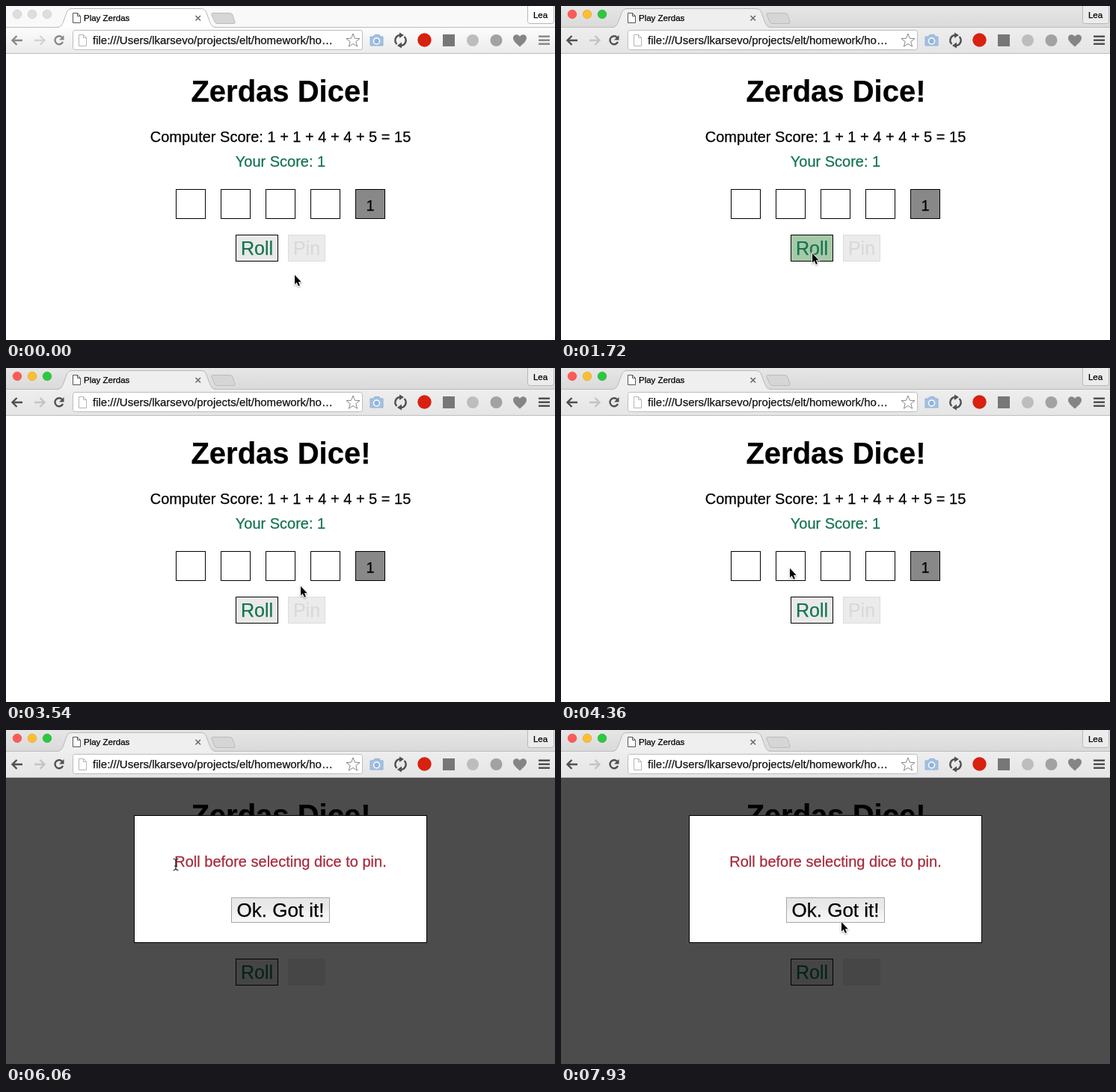
Animation, 734 px wide and 447 px high, one loop 8000 ms. Source, as an HTML page:

```html
<!DOCTYPE html>
<html lang="en">
<head>
<meta charset="utf-8">
<title>Play Zerdas</title>
<style>
  html, body { margin: 0; width: 100%; height: 100%; overflow: hidden; background: #fff; }
  svg { display: block; width: 734px; height: 447px; font: 20px "Liberation Sans", Arial, sans-serif; }
  text { fill: currentColor; stroke: currentColor; stroke-width: .25; }
  .mid { text-anchor: middle; }
  .line { fill: none; stroke: #505050; stroke-width: 2.4; }
  .big { font-size: 25px; }
  .small { font-size: 11.5px; }
  .blur .nav { opacity: .65; }
  .blur .lights circle { fill: #dedede; stroke: #c4c4c4; }
  .blur .strip { fill: #f9f9f9; }
  .blur .bar { fill: url(#pale); }
  .blur .tab, .blur .user { fill: #fff; }
  #arrow { filter: drop-shadow(0 1px 1px #0005); }
</style>
</head>
<body>
<svg viewBox="0 0 734 447">
  <defs>
    <linearGradient id="top" x2="0" y2="1"><stop stop-color="#e6e6e6"/><stop offset="1" stop-color="#dadada"/></linearGradient>
    <linearGradient id="bar" x2="0" y2="1"><stop stop-color="#eee"/><stop offset="1" stop-color="#e5e5e5"/></linearGradient>
    <linearGradient id="pale" x2="0" y2="1"><stop stop-color="#fdfdfd"/><stop offset="1" stop-color="#ebebeb"/></linearGradient>
    <linearGradient id="key" x2="0" y2="1"><stop stop-color="#e6e6e6"/><stop offset=".48" stop-color="#ebebeb"/><stop offset=".52" stop-color="#f0f0f0"/><stop offset="1" stop-color="#f8f8f8"/></linearGradient>
  </defs>

  <!-- page -->
  <text class="mid" x="367.5" y="128" font-size="40" font-weight="bold">Zerdas Dice!</text>
  <text class="mid" x="367" y="182">Computer Score: 1 + 1 + 4 + 4 + 5 = 15</text>
  <text class="mid" x="367" y="215" color="#13744e">Your Score: 1</text>
  <g id="dice" fill="#fff" stroke="#000"></g>
  <text class="mid" x="487" y="274">1</text>
  <rect id="roll" x="307.5" y="306.5" width="56" height="35" stroke="#000"/>
  <text class="big mid" x="335.5" y="333" color="#13744e">Roll</text>
  <rect x="377" y="306" width="50" height="36" fill="#ebebeb"/>
  <g id="pin">
    <rect x="377.5" y="306.5" width="49" height="35" fill="none" stroke="#dcdcdc"/>
    <text class="big mid" x="402" y="333" color="#d9d9d9">Pin</text>
  </g>

  <!-- message -->
  <g id="modal">
    <rect y="64" width="734" height="383" opacity=".7"/>
    <rect x="171.5" y="114.5" width="391" height="170" fill="#fff" stroke="#000"/>
    <text class="mid" x="367" y="183" color="#a62a3c">Roll before selecting dice to pin.</text>
    <rect x="301.5" y="224.5" width="131" height="33" fill="url(#key)" stroke="#a8a8a8"/>
    <text class="mid" x="367" y="250" font-size="26">Ok. Got it!</text>
  </g>

  <!-- browser -->
  <g id="browser">
    <rect class="strip" width="734" height="28" fill="url(#top)"/>
    <g class="lights" stroke-width=".6">
      <circle cx="15" cy="11" r="5.8" fill="#fc5b57" stroke="#e2443f"/>
      <circle cx="35" cy="11" r="5.8" fill="#fdbe30" stroke="#dfa023"/>
      <circle cx="55" cy="11" r="5.8" fill="#2bc840" stroke="#1dac2c"/>
    </g>
    <path d="M277 9.5H299Q302 9.5 303 12L306 21Q307 23.5 304 23.5H283Q280 23.5 279 21L275 12Q274 9.5 277 9.5Z" fill="#d6d6d6" stroke="#bbb"/>
    <rect class="bar" y="28" width="734" height="35" fill="url(#bar)"/>
    <path d="M0 28.5H734" stroke="#bdbdbd"/>
    <path class="tab" d="M68 29C74 28 75 25 77 20L81 9Q83 3.500 88 3.500H261Q266 3.500 268 9L272 20C274 25 275 28 281 29Z" fill="#efefef"/>
    <path d="M68 28.5C74 28 75 25 77 20L81 9Q83 3.5 88 3.5H261Q266 3.5 268 9L272 20C274 25 275 28 281 28.5" fill="none" stroke="#b8b8b8"/>
    <path d="M0 63.5H734" stroke="#bdbdbd"/>
    <path d="M89.5 9.5H95.5L99.5 13.5V22.5H89.5ZM95.5 9.5V13.5H99.5" fill="#fff" stroke="#555"/>
    <text class="small" x="104" y="20">Play Zerdas</text>
    <path d="M253.5 13L260 19.5M260 13L253.5 19.5" stroke="#666" stroke-width="1.5"/>
    <rect class="user" x="697.5" y="-3" width="35" height="26.5" rx="3" fill="#ececec" stroke="#b8b8b8"/>
    <text class="small mid" x="714.5" y="16">Lea</text>

    <g class="nav">
      <path class="line" d="M22 46H9M14.500 40L8.500 46L14.500 52"/>
      <path class="line" d="M38 46H51M45.500 40L51.500 46L45.500 52" style="stroke:#c4c4c4"/>
      <path class="line" d="M75 42A5.500 5.500 0 1 0 76 48"/>
      <path d="M77.500 39V45.500H71Z" fill="#505050"/>
      <path d="M712 39.500h15v2.600h-15zM712 44.500h15v2.600h-15zM712 49.500h15v2.600h-15z" fill="#505050"/>
    </g>
    <rect x="89.5" y="32.5" width="387" height="26" rx="3" fill="#fff" stroke="#bdbdbd"/>
    <path d="M97.5 38.5H103.5L107.5 42.5V53.5H97.5ZM103.5 38.5V42.5H107.5" fill="#fff" stroke="#b5b5b5"/>
    <text x="116" y="51" font-size="15" color="#111">file:///Users/lkarsevo/projects/elt/homework/ho…</text>
    <path id="star" fill="#fff" stroke="#888" stroke-linejoin="round"/>

    <path d="M487 41H491L493 38.5H499L501 41H504V53H487Z" fill="#a3c0e0" stroke="#93b2d6"/>
    <circle cx="495.5" cy="47" r="4" fill="#8fb3dc" stroke="#fff" stroke-width="1.5"/>
    <path class="line" d="M522.500 51A7 7 0 0 1 527 39M532.500 41A7 7 0 0 1 528 53"/>
    <path d="M526 35.500L532 39L526 43ZM529 48.500L523 53L529 56.500Z" fill="#505050"/>
    <circle cx="559.5" cy="45.5" r="9.2" fill="#d8210f"/>
    <rect x="584" y="38" width="16" height="16" fill="#777"/>
    <circle cx="624" cy="46" r="8" fill="#bdbdbd"/>
    <circle cx="655.5" cy="46" r="8" fill="#a2a2a2"/>
    <path d="M687 54.500C682 50 678 47 678 42.500C678 37.500 685 36.500 687 41C689 36.500 696 37.500 696 42.500C696 47 692 50 687 54.500Z" fill="#858585"/>
  </g>

  <!-- pointers -->
  <path id="arrow" d="M0 0V12.500L2.800 10L4.900 14.800L6.900 14L4.900 9.300H8.700Z" stroke="#fff" paint-order="stroke" stroke-width="1.800"/>
  <path id="beam" d="M-3.500-7.500Q0-7.500 0-5Q0-7.500 3.500-7.500M0-5V5M-3.500 7.500Q0 7.500 0 5Q0 7.500 3.500 7.500M-2 2H2" fill="none" stroke="#222" stroke-width="1.200"/>
</svg>
<script>
const $ = id => document.getElementById(id);
const show = (id, on) => $(id).setAttribute('visibility', on ? 'visible' : 'hidden');

$('dice').innerHTML = [0, 1, 2, 3, 4].map(i =>
  `<rect x="${227.5 + 60 * i}" y="245.5" width="39" height="39"${i > 3 ? ' fill="#888"' : ''}/>`).join('');

$('star').setAttribute('d', 'M' + Array.from({ length: 10 }, (_, i) => {
  const a = i * Math.PI / 5, r = i % 2 ? 4 : 9.5;
  return (464 + r * Math.sin(a)).toFixed(1) + ' ' + (46.5 - r * Math.cos(a)).toFixed(1);
}).join('L') + 'Z');

// Pointer moves: first step, last step, step count, x, y, eased
const moves = [
  [60, 200, 3, 391, 377],
  [800, 1600, 14, 337, 329, 1],
  [1660, 1720, 2, 336, 331],
  [1780, 1900, 3, 358, 324],
  [1960, 2120, 3, 343, 325],
  [2300, 2420, 3, 356, 325],
  [2780, 2780, 1, 369, 320],
  [2840, 2950, 3, 424, 300],
  [3310, 4070, 12, 308, 268, 1],
  [4130, 4130, 1, 304, 268],
  [4300, 4360, 2, 306, 268],
  [5560, 6060, 9, 227, 180],
  [6120, 6350, 5, 271, 173],
  [6370, 7160, 16, 446, 180],
  [7210, 7330, 3, 477, 180],
  [7630, 7930, 6, 375, 257]
];

function pointer(t) {
  let x = 386, y = 360;
  for (const [from, to, n, tx, ty, eased] of moves) {
    if (t < from) break;
    const step = Math.floor((t - from) / (to - from || 1) * (n - 1) + 1e-3) + 1;
    let p = Math.min(step / n, 1);
    if (eased) p = p * p * (3 - 2 * p);
    x += (tx - x) * p;
    y += (ty - y) * p;
  }
  return [Math.round(x), Math.round(y)];
}

function draw(t) {
  const [x, y] = pointer(t);
  const modal = t >= 4840;
  const beam = modal && x > 224 && x < 510 && y > 164 && y < 189;
  const hover = x > 307 && x < 372 && y > 306 && y < 342;
  $('browser').setAttribute('class', t < 500 ? 'blur' : '');
  $('roll').setAttribute('fill', hover ? '#a5c9a7' : '#e9e9e9');
  show('modal', modal);
  show('pin', !modal);
  show('beam', beam);
  show('arrow', !beam);
  $(beam ? 'beam' : 'arrow').setAttribute('transform', `translate(${x} ${y})`);
}

function loop() {
  draw(performance.now() % 8000);
  requestAnimationFrame(loop);
}
loop();
</script>
</body>
</html>
```
